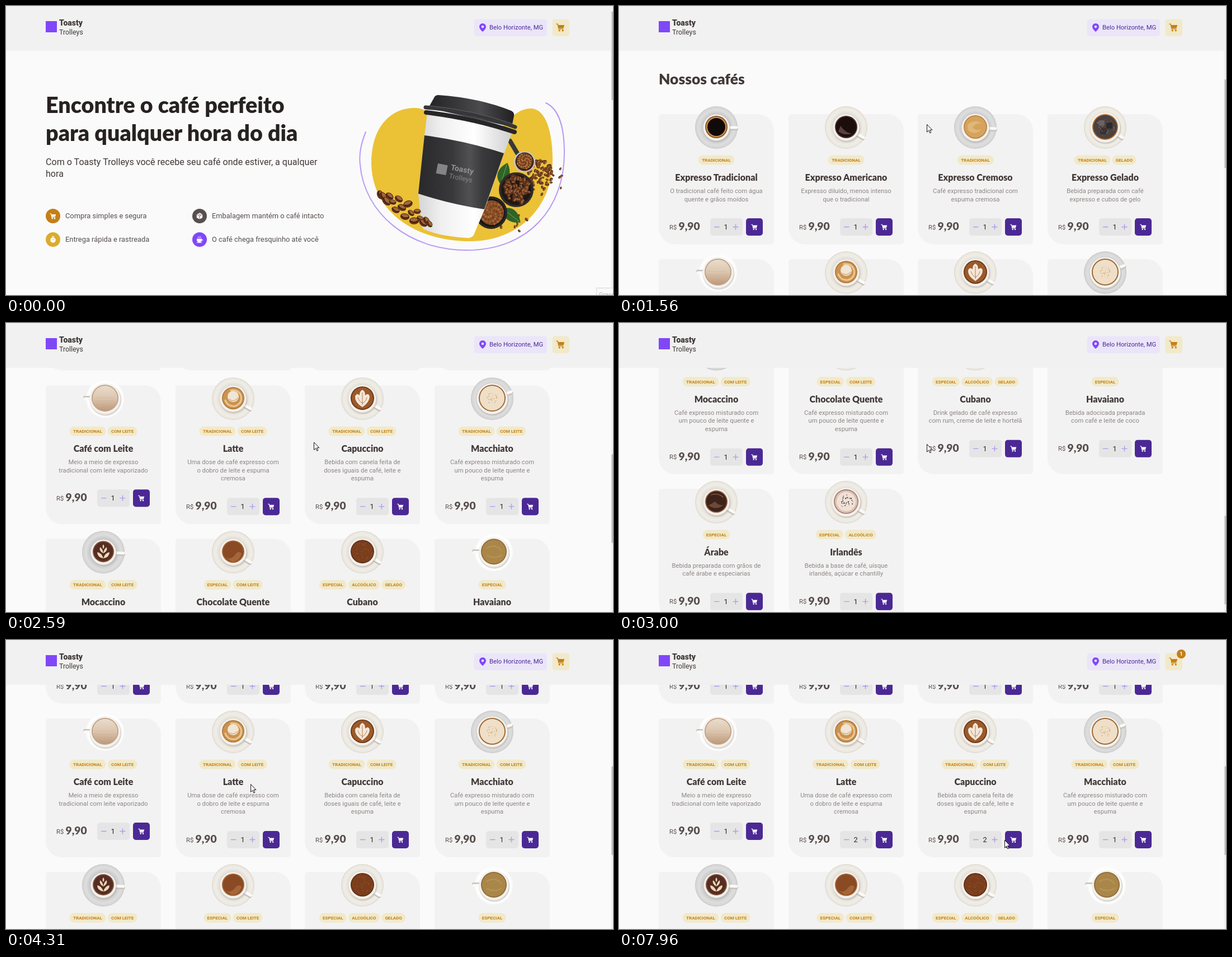
Recreate the animation shown at these times as an HTML page. Size 1085x516 px, loop 8 s.

```html
<!DOCTYPE html>
<html lang="pt-BR">
<head>
<meta charset="utf-8">
<title>Toasty Trolleys</title>
<style>
html, body { margin: 0; height: 100%; overflow: hidden; background: #fafafa; }
svg { display: block; width: 100vw; height: 100vh; font-family: Roboto, sans-serif; }
.display { font-family: Lato, sans-serif; font-weight: 900; }
.mid { text-anchor: middle; }
</style>
</head>
<body>
<svg id="stage" viewBox="0 0 1085 516"></svg>
<script>
const LOOP = 8000;
const stage = document.getElementById('stage');

let seed = 7;
const random = () => (seed = seed * 16807 % 2147483647) / 2147483647;

const text = (x, y, size, fill, value, extra = '') =>
  `<text x="${x}" y="${y}" font-size="${size}" fill="${fill}" ${extra}>${value}</text>`;
const rect = (x, y, w, h, r, fill) =>
  `<rect x="${x}" y="${y}" width="${w}" height="${h}" rx="${r}" fill="${fill}"/>`;
const circle = (x, y, r, fill, extra = '') =>
  `<circle cx="${x}" cy="${y}" r="${r}" fill="${fill}" ${extra}/>`;
const path = (d, fill, extra = '') => `<path d="${d}" fill="${fill}" ${extra}/>`;
const line = (d, color, width, extra = '') =>
  path(d, 'none', `stroke="${color}" stroke-width="${width}" stroke-linecap="round" ${extra}`);
const place = (x, y, content, more = '') => `<g transform="translate(${x} ${y}) ${more}">${content}</g>`;

const gradient = (id, stops, tag = 'linearGradient', extra = '') => `<${tag} id="${id}" ${extra}>` +
  stops.map(([offset, color]) => `<stop offset="${offset}" stop-color="${color}"/>`).join('') + `</${tag}>`;

const defs = `<defs>
  ${gradient('lid', [[0, '#242426'], [.35, '#39393b'], [.6, '#4b4b4e'], [1, '#202022']])}
  ${gradient('sleeve', [[0, '#29292b'], [.4, '#39393b'], [.6, '#515154'], [.75, '#3a3a3c'], [1, '#2b2b2d']])}
  ${gradient('paper', [[0, '#d5d5d5'], [.25, '#f0f0f0'], [.6, '#ffffff'], [1, '#d0d0d0']])}
  ${gradient('warm', [[0, '#d8d3ca'], [.65, '#e3dfd7'], [.82, '#f0ede7'], [.94, '#ebe8e1'], [1, '#d9d5cc']], 'radialGradient')}
  ${gradient('gray', [[0, '#c0c0c0'], [.65, '#cbcbcb'], [.82, '#dedede'], [.95, '#d6d6d6'], [1, '#c3c3c3']], 'radialGradient')}
  ${gradient('white', [[0, '#e8e6e3'], [.72, '#f4f3f1'], [.86, '#ffffff'], [1, '#fafafa']], 'radialGradient')}
  ${gradient('milk', [[0, '#e9dccd'], [.5, '#dcc6af'], [1, '#bd9a7c']], 'linearGradient', 'x2="0" y2="1"')}
</defs>`;

const cart = (color, scale) => `<g transform="scale(${scale})">` +
  line('M-8-6.5h2.5l2.3 10h8.6', color, 1.6) + path('M-5-4.5h13l-2 6.5h-9.5z', color) +
  circle(-2, 6.5, 1.8, color) + circle(4.7, 6.5, 1.8, color) + '</g>';

// Hero
const bean = (x, y, size, angle) => place(x, y,
  `<ellipse rx="${size}" ry="${size * .7}" fill="#5f3019"/>` +
  `<ellipse cy="${-size * .12}" rx="${size * .78}" ry="${size * .44}" fill="#a1663d"/>` +
  line(`M${-size * .8} 0q${size * .8} ${size * .5} ${size * 1.6} 0`, '#32170c', size * .18), `rotate(${angle})`);

function heap(x, y, radius, count, size) {
  let out = '';
  for (let i = 0; i < count; i++) {
    const angle = random() * 6.283, distance = radius * Math.sqrt(random());
    out += bean(x + distance * Math.cos(angle), y + distance * Math.sin(angle), size * (.7 + random() * .5), random() * 180);
  }
  return out;
}

function powder(x, y, radius) {
  let out = circle(x, y, radius, '#8a4f27');
  for (let i = 0; i < 70; i++) {
    const angle = i * 2.4, distance = radius * Math.sqrt(i / 72);
    out += circle(x + distance * Math.cos(angle), y + distance * Math.sin(angle), .8 + random(), i % 2 ? '#6b3817' : '#b27443');
  }
  return out;
}

function spilledBeans() {
  let out = '';
  for (let i = 0; i < 17; i++) {
    const along = i / 16;
    out += bean(669 + along * 88, 337 + along * 52 + (i % 3 - 1) * 13 * Math.sin(along * 3.14), 6.5 + random() * 2.5, random() * 90 - 20);
  }
  return out;
}

const leaf = (x, y, angle) => place(x, y,
  path('M0 0C10-15 26-14 40 0C26 13 11 14 0 0', '#2f6328') + line('M2 0H37', '#7aa84a', .9), `rotate(${angle})`);

const cup =
  path('M753 190L904 226Q898 245 890 264L856 362L836 409Q832 415 824 414Q775 411 748 399Q743 397 742 388L737 335L748 231Z', 'url(#paper)') +
  path('M748 231Q820 240 890 263L855 363Q795 354 737 335Z', 'url(#sleeve)') +
  path('M765 164Q767 159 773 159Q846 164 903 187Q909 190 908 196L904 216L755 182Z', 'url(#lid)') +
  line('M751 190Q835 200 909 225', '#262628', 8) + line('M750 181Q835 188 910 216', '#37373a', 7) +
  line('M757 178Q835 186 905 210', '#626266', 1) +
  place(772, 281, rect(0, 0, 18, 18, 0, '#858587') +
    text(24, 7, 14, '#919193', 'Toasty', 'font-weight="700"') + text(24, 22, 12.2, '#858587', 'Trolleys'), 'rotate(11)');

const illustration =
  path('M653 278C654 213 690 182 730 182C775 182 770 240 835 240C890 240 895 184 938 183C965 183 977 225 977 275C977 360 915 420 830 420C735 420 653 370 653 278Z', '#ebc136') +
  line('M643 225C634 247 631 268 633 283C640 370 720 436 823 436C935 436 998 360 998 262C998 210 985 182 965 173', '#b79bf4', 2) +
  heap(952, 302, 27, 75, 3.4) + heap(958, 315, 45, 14, 3) + heap(908, 390, 26, 12, 3) +
  leaf(884, 318, -72) + leaf(888, 362, 38) +
  line('M901 241L914 263', '#38383a', 8) + circle(927, 278, 19, '#c8c6c3') + circle(927, 278, 16.5, '#3a211a') + powder(927, 277, 14) +
  circle(912, 328, 31, '#302b29') + circle(912, 328, 27, '#1e1815') + heap(912, 328, 24, 85, 4.4) +
  circle(867, 369, 29, '#292625') + circle(867, 369, 25, '#171413') + powder(868, 369, 22) +
  cup + spilledBeans();

const benefitIcons = [
  cart('#fff', .66),
  path('M0-5.8 5.2-3v6L0 5.8-5.2 3v-6z', '#fff') + line('M-5-3 0 0 5-3M0 0v5.5M-2.6-4.4 2.6-1.5', '#574f4d', .8),
  circle(0, .8, 4.8, '#fff') + line('M-1.6-5.4h3.2', '#fff', 1.2) + line('M0 .8 2-1.2', '#dbac2c', 1),
  path('M-5-1.5H4v2q0 3-3 4.5h-3q-3-1.5-3-4.5z', '#fff') + line('M4-.5q2.4 0 1.6 2.2-.6 1-2.2 1M-2.5-3.2v-2M-.2-3.2v-2M2-3.2v-2M-5 5.5h9', '#fff', .9)
];
const benefits = [
  [84, 375, '#c47f17', 'Compra simples e segura'],
  [346, 375, '#574f4d', 'Embalagem mantém o café intacto'],
  [84, 417, '#dbac2c', 'Entrega rápida e rastreada'],
  [346, 417, '#8047f8', 'O café chega fresquinho até você']
];

const hero =
  text(71, 191, 39.4, '#272221', 'Encontre o café perfeito', 'class="display"') +
  text(71, 241, 39.4, '#272221', 'para qualquer hora do dia', 'class="display"') +
  text(71, 283.5, 16.09, '#403937', 'Com o Toasty Trolleys você recebe seu café onde estiver, a qualquer') +
  text(71, 304.5, 16.09, '#403937', 'hora') +
  benefits.map(([x, y, color, label], i) => circle(x, y, 13, color) + place(x, y, benefitIcons[i]) +
    text(x + 22, y + 3.6, 12.87, '#574f4d', label)).join('') +
  illustration;

// Menu cards
function specks(count, radius, color, size) {
  let out = '';
  for (let i = 0; i < count; i++) {
    const angle = i * 2.4, distance = radius * Math.sqrt(random());
    out += circle(distance * Math.cos(angle), distance * Math.sin(angle), size * (.5 + random()), color);
  }
  return out;
}

const art = {
  black: circle(0, 0, 16, '#120a08'),
  shine: path('M-14 8Q-4 16 10 12Q-2 10-10-2Z', '#5a403c'),
  crema: path('M-14-4Q0-16 12-5Q2-9-5 1Q2 8 11 4Q0 16-13 6Z', '#e8c48b', 'opacity=".6"'),
  ice: rect(-12, -12, 11, 10, 3, '#6a6160') + rect(2, -8, 11, 11, 3, '#302a2a') + rect(-9, 2, 12, 11, 3, '#39302f') + specks(22, 17, '#7b706d', .9),
  milk: line('M-17-1h33M-18 5h35M-16 11h31', '#c8aa8d', 1, 'opacity=".4"'),
  latte: line('M-14 4Q-9 16 4 14Q17 9 14-4Q10-16-4-14', '#e9c794', 3) + circle(0, -3, 10, '#f1e5d5') + line('M-7 2Q0 8 8 0', '#d6ad78', 1.4),
  heart: path('M0 16Q-14 7-13-3Q-10-10-5-5Q-5-13 0-15Q5-13 5-5Q11-10 13-3Q13 7 0 16Z', '#f4e7d9') + line('M0-10V12M-8-1Q-5 7 0 9Q6 7 8-1', '#b47a4c', 1),
  foam: circle(0, 0, 22, '#efdfc8') + specks(28, 10, '#d3ad75', .7),
  leaf: path('M0 12Q-11 10-11 1Q-3 2 0 12Q3 2 11 1Q11 10 0 12M0 3Q-8-1-6-8Q-1-5 0 3Q1-5 6-8Q8-1 0 3M0-5Q-3-9 0-13Q3-9 0-5', '#ecd9b9'),
  chocolate: path('M-16 9Q-5 17 4 5Q9-2 15 3Q12 17-2 18Z', '#a5663a'),
  cocoa: specks(45, 18, '#9a5c33', .6),
  golden: line('M-13-6Q4-15 13-2M-12 7Q2 14 14 6', '#b5955a', 2),
  arabic: path('M-14 7Q0 17 13 6Q4 8-2 0Z', '#6c4938') + line('M-9-12Q3-16 12-8', '#805841', 1.5),
  chips: circle(0, 0, 17, '#efe1d8') + specks(24, 12, '#43312b', .9)
};

const tagWidths = { 'TRADICIONAL': 65, 'GELADO': 43, 'COM LEITE': 53, 'ESPECIAL': 49, 'ALCOÓLICO': 56 };

// name | tags | description lines | saucer, handle angle, coffee radius, rim colour, coffee colour, art
const menu = [
  ['Expresso Tradicional', 'TRADICIONAL', 'O tradicional café feito com água/quente e grãos moídos', 'gray', 0, 20, '#8c5424', '#c8924f', 'black'],
  ['Expresso Americano', 'TRADICIONAL', 'Expresso diluído, menos intenso/que o tradicional', 'warm', 30, 20, '#49302b', '#1c0e0d', 'shine'],
  ['Expresso Cremoso', 'TRADICIONAL', 'Café expresso tradicional com/espuma cremosa', 'gray', 3, 21, '#bb8443', '#d5a35c', 'crema'],
  ['Expresso Gelado', 'TRADICIONAL,GELADO', 'Bebida preparada com café/expresso e cubos de gelo', 'warm', 30, 23, '#b36b27', '#4a4140', 'ice'],
  ['Café com Leite', 'TRADICIONAL,COM LEITE', 'Meio a meio de expresso/tradicional com leite vaporizado', 'white', 180, 24, '#c1a084', 'url(#milk)', 'milk'],
  ['Latte', 'TRADICIONAL,COM LEITE', 'Uma dose de café expresso com/o dobro de leite e espuma/cremosa', 'warm', 30, 20, '#b47a39', '#cb9351', 'latte'],
  ['Capuccino', 'TRADICIONAL,COM LEITE', 'Bebida com canela feita de/doses iguais de café, leite e/espuma', 'warm', 30, 21, '#6c3516', '#9b5a2a', 'heart'],
  ['Macchiato', 'TRADICIONAL,COM LEITE', 'Café expresso misturado com/um pouco de leite quente e/espuma', 'gray', -20, 24, '#9a6531', '#c8995c', 'foam'],
  ['Mocaccino', 'TRADICIONAL,COM LEITE', 'Café expresso misturado com/um pouco de leite quente e/espuma', 'gray', 3, 19, '#80543e', '#572d23', 'leaf'],
  ['Chocolate Quente', 'ESPECIAL,COM LEITE', 'Café expresso misturado com/um pouco de leite quente e/espuma', 'warm', 30, 20, '#a66538', '#8a4a23', 'chocolate'],
  ['Cubano', 'ESPECIAL,ALCOÓLICO,GELADO', 'Drink gelado de café expresso/com rum, creme de leite e hortelã', 'warm', 30, 21, '#633016', '#7b3e1d', 'cocoa'],
  ['Havaiano', 'ESPECIAL', 'Bebida adocicada preparada/com café e leite de coco', 'white', 180, 23, '#8f6b37', '#aa8649', 'golden'],
  ['Árabe', 'ESPECIAL', 'Bebida preparada com grãos de/café árabe e especiarias', 'warm', 30, 20, '#8d583b', '#3e231a', 'arabic'],
  ['Irlandês', 'ESPECIAL,ALCOÓLICO', 'Bebida a base de café, uísque/irlandês, açúcar e chantilly', 'warm', 30, 22, '#a87f70', '#dcc2b5', 'chips']
];
const rowTops = [593, 852, 1126, 1399];
const rowHeights = [232.5, 248, 247, 232.5];

function coffee(saucer, angle, radius, rim, color, topping) {
  const shift = saucer === 'white' ? 3 : 0;
  return circle(shift, 0, saucer === 'white' ? 34 : 38, `url(#${saucer})`) +
    place(shift, 0,
      `<g transform="rotate(${angle})">` + line('M22 2h14', '#c6c2bb', 6) + line('M22 0h14', '#fbfaf8', 5) + '</g>' +
      circle(1, 2, radius + 4.5, '#bcb6ad', 'opacity=".5"') + circle(0, 0, radius + 3.5, '#f4f1ed') +
      circle(0, -1, radius, rim) + circle(0, -1, radius - 1.8, color) + place(0, -1, art[topping]));
}

function tags(names) {
  const widths = names.map(name => tagWidths[name]);
  let x = 103 - (widths.reduce((a, b) => a + b) + 3.2 * (names.length - 1)) / 2;
  return names.map((name, i) => {
    const out = rect(x, 73.5, widths[i], 17, 8.5, '#f1e9c9') +
      text(x + widths[i] / 2, 84.8, 8.04, '#c47f17', name, 'class="mid" font-weight="700"');
    x += widths[i] + 3.2;
    return out;
  }).join('');
}

function card([name, tagNames, description, ...drink], i) {
  const row = i >> 2, height = rowHeights[row], lines = description.split('/');
  const controlsTop = 186 + (lines.length - 2) * 15;
  return place(Math.round(71 + i % 4 * 231.7), rowTops[row],
    path(`M5 0H177A29 29 0 0 1 206 29V${height - 5}a5 5 0 0 1-5 5H29A29 29 0 0 1 0 ${height - 29}V5A5 5 0 0 1 5 0`, '#f3f2f2') +
    place(103, 24, coffee(...drink)) + tags(tagNames.split(',')) +
    text(103, 119, 16, '#403937', name, 'class="display mid"') +
    lines.map((value, n) => text(103, 141 + n * 14.6, 11.26, '#8d8686', value, 'class="mid"')).join('') +
    place(0, controlsTop,
      text(19, 19.5, 11.26, '#574f4d', 'R$') + text(35.5, 21, 19.3, '#574f4d', '9,90', 'class="display"') +
      rect(92, 0, 58, 31, 5, '#e6e5e5') +
      line('M99.5 15.5h8.5M133 15.5h9M137.5 11v9', '#ad9cec', 1.4) +
      text(120, 19.7, 12.87, '#272221', '1', `class="mid" id="quantity${i}"`) +
      rect(156, 0, 30, 31, 5, '#4b2995') + place(171, 15.5, cart('#fff', .66))));
}

const header = rect(0, 0, 1085, 80, 0, '#f1f1f1') +
  rect(71, 27, 20, 20, 0, '#8047f8') +
  text(95, 35, 14, '#403937', 'Toasty', 'font-weight="800"') + text(95, 51, 12.4, '#403937', 'Trolleys') +
  rect(836.5, 23.5, 130.5, 30.5, 5, '#ebe5f9') +
  path('M852 46Q846 41 846 37a6 6 0 0 1 12 0q0 4-6 9z', '#8047f8') + circle(852, 37, 2.3, '#ebe5f9') +
  text(864, 42, 11.26, '#4b2995', 'Belo Horizonte, MG') +
  rect(976.5, 23.5, 30.5, 30.5, 5, '#f1e9c9') + place(991, 38, cart('#c47f17', .9)) +
  `<g id="badge">${circle(1005, 25, 8, '#c47f17')}${text(1005, 28.3, 9.6, '#fff', '1', 'class="mid" font-weight="700"')}</g>`;

stage.innerHTML = defs + rect(0, 0, 1085, 516, 0, '#fafafa') +
  `<g id="page">${hero}${text(71, 539.5, 26.4, '#403937', 'Nossos cafés', 'class="display"')}${menu.map(card).join('')}</g>` +
  header + rect(1081, 0, 4, 516, 0, '#f1f1f1') +
  `<g id="thumb">${rect(1082.5, 10, 2.5, 158, 0, '#b9b9b9')}</g>` +
  `<g id="tooltip"><rect x="1055.5" y="503.5" width="40" height="20" fill="#f8f8f8" stroke="#d6d6d6"/>${text(1060, 519, 11, '#b5b5b5', 'Gravar')}</g>` +
  `<g id="pointer" stroke="#111" stroke-width="1" stroke-linejoin="round">
    <path id="arrow" fill="#fff" d="M.5.5v13.6l3.2-3 2.1 4.7 2-.9-2.1-4.6h4.2z"/>
    <path id="hand" fill="#fff" d="M-1.7 1.5a1.6 1.6 0 0 1 3.2 0v5l4.2.9q2.3.6 2.3 2.8v4l-1.6 3v2.6h-7v-2L-5.7 11.5q.2-2.5 2.2-1.3l1.8 1.6z"/>
  </g>`;

// Each key: time, then the values reached at that time
const scrollKeys = [
  [0, 0], [970, 0], [1030, 90], [1100, 195], [1170, 285], [1230, 345], [1300, 385], [1360, 400],
  [1700, 400], [1760, 424], [1900, 555], [2040, 670], [2190, 722],
  [2530, 722], [2590, 740], [2720, 850], [2860, 1000], [3000, 1103], [3070, 1113],
  [3380, 1113], [3480, 1060], [3640, 900], [3800, 765], [3920, 712], [LOOP, 712]
];
const pointerKeys = [
  [0, 1100, 530], [230, 1100, 530], [400, 960, 440], [650, 700, 270], [900, 560, 196], [1000, 550, 188], [1500, 550, 188],
  [1560, 550, 211], [2590, 550, 212.5], [3000, 550, 216], [3850, 549, 219],
  [4180, 431, 233], [4310, 437, 257], [4600, 463, 320], [4800, 452, 352], [5000, 441, 357],
  [5350, 441, 357], [5680, 461, 365], [5780, 461, 365], [6000, 480, 361], [6450, 480, 361],
  [6600, 505, 361], [6900, 600, 350], [7200, 688, 352], [7420, 672, 357], [7800, 672, 357], [7960, 689, 357], [LOOP, 689, 357]
];

function sample(keys, time) {
  const next = Math.max(1, keys.findIndex(key => key[0] > time));
  const from = keys[next - 1], to = keys[next];
  const mix = (time - from[0]) / (to[0] - from[0]);
  return from.slice(1).map((value, i) => value + (to[i + 1] - value) * mix);
}

const byId = id => document.getElementById(id);
const move = (id, x, y) => byId(id).setAttribute('transform', `translate(${x} ${y})`);
const show = (id, visible) => byId(id).setAttribute('visibility', visible ? 'visible' : 'hidden');

function render(time) {
  const [scroll] = sample(scrollKeys, time);
  move('page', 0, -scroll);
  move('thumb', 0, scroll / 3.3);
  move('pointer', ...sample(pointerKeys, time));
  const hand = time >= 4860 && time < 6530 || time >= 7300 && time < 7880;
  show('hand', hand);
  show('arrow', !hand);
  show('tooltip', time < 70);
  show('badge', time >= 6180);
  byId('quantity5').textContent = time < 5200 ? 1 : 2;
  byId('quantity6').textContent = time < 7750 ? 1 : 2;
}

const start = performance.now();
function tick() {
  render((performance.now() - start) % LOOP);
  requestAnimationFrame(tick);
}
tick();
</script>
</body>
</html>
```
